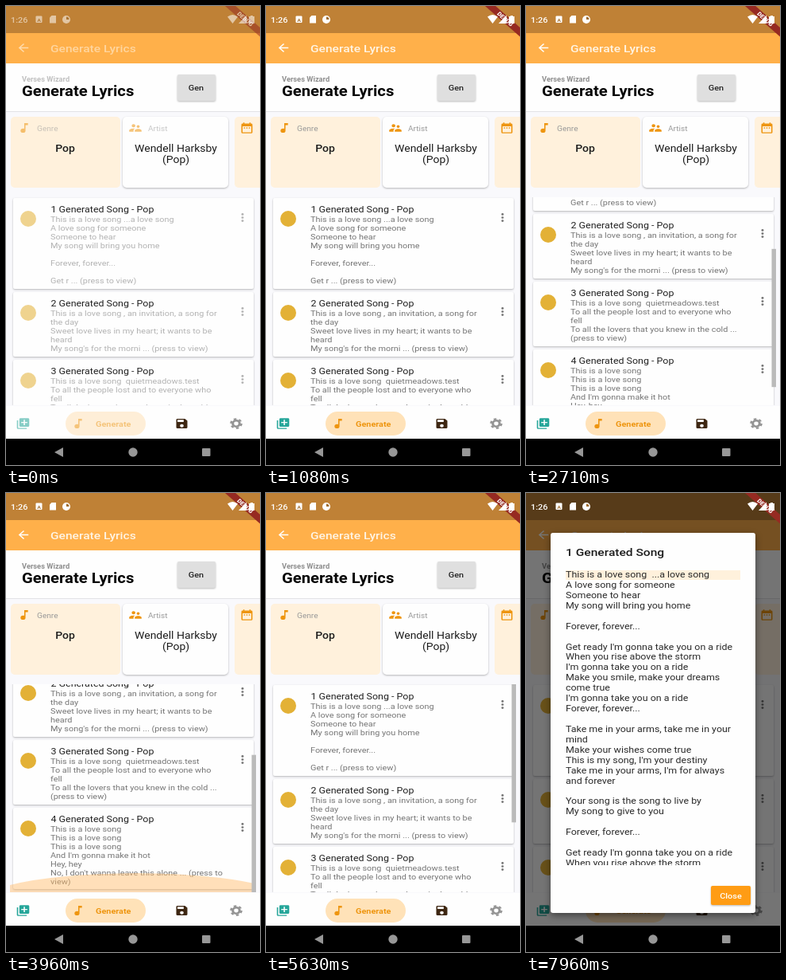
Animation, 320 px wide and 576 px high, one loop 8 s. Source, as an HTML page:

```html
<!DOCTYPE html>
<html lang="en">
<head>
<meta charset="utf-8">
<title>Generate Lyrics</title>
<style>
  html, body { margin: 0; width: 100%; height: 100%; overflow: hidden; background: #000; }
  svg { display: block; width: 100vw; height: 100vh; }
  text { font-family: Roboto, sans-serif; white-space: pre; }
  .card { filter: drop-shadow(0 1px 1px rgba(0, 0, 0, .27)); }
</style>
</head>
<body>
<svg id="stage" viewBox="0 0 320 576" preserveAspectRatio="none"></svg>
<script>
// The phone screen is 411.4 x 846.4 dp, shown on 320 x 576 pixels.
const SX = 320 / 411.4, SY = 576 / 846.4;
const LOOP = 8000, MAX_SCROLL = 134, VIEW_TOP = 240, VIEW_HEIGHT = 262;
const THUMB = VIEW_HEIGHT * VIEW_HEIGHT / (VIEW_HEIGHT + MAX_SCROLL);

const ORANGE = '#ee950f', INK = '#1c1c1c', GREY = '#757575', PEACH = '#fff1dc';

const dp = (x, y) => `transform="translate(${x} ${y}) scale(${SX} ${SY})"`;
const text = (str, x, y, size, fill, weight = 400, anchor = 'start') =>
  `<text ${dp(x, y)} font-size="${size}" fill="${fill}" font-weight="${weight}" text-anchor="${anchor}">${str}</text>`;
const lines = (list, x, y, size, pitch, fill) =>
  list.map((str, i) => text(str, x, y + i * pitch * SY, size, fill)).join('');
const rect = (x, y, w, h, fill, r = 0, extra = '') =>
  `<rect x="${x}" y="${y}" width="${w}" height="${h}" rx="${r}" fill="${fill}" ${extra}/>`;
const icon = (name, x, y, fill) =>
  `<g ${dp(x, y)}><path transform="translate(-12 -12)" d="${ICONS[name]}" fill="${fill}"/></g>`;

const ICONS = {
  back: 'M20 11H7.8l5.6-5.6L12 4l-8 8 8 8 1.4-1.4L7.8 13H20z',
  note: 'M12 3v10.55c-.59-.34-1.27-.55-2-.55a4 4 0 1 0 4 4V7h4V3z',
  people: 'M16.5 12a2.5 2.5 0 1 0 0-5 2.5 2.5 0 0 0 0 5zM9 11a3 3 0 1 0 0-6 3 3 0 0 0 0 6zm7.5 3c-1.8 0-5.5.9-5.5 2.75V19h11v-2.25C22 14.9 18.3 14 16.5 14zM9 13c-2.3 0-7 1.2-7 3.5V19h7v-2.25c0-.85.3-2.3 2.4-3.5C10.5 13.1 9.7 13 9 13z',
  dates: 'M9 11H7v2h2zm4 0h-2v2h2zm4 0h-2v2h2zm2-7h-1V2h-2v2H8V2H6v2H5a2 2 0 0 0-2 2v14a2 2 0 0 0 2 2h14a2 2 0 0 0 2-2V6a2 2 0 0 0-2-2zm0 16H5V9h14z',
  more: 'M12 8a2 2 0 1 0 0-4 2 2 0 0 0 0 4zm0 6a2 2 0 1 0 0-4 2 2 0 0 0 0 4zm0 6a2 2 0 1 0 0-4 2 2 0 0 0 0 4z',
  add: 'M4 6H2v14a2 2 0 0 0 2 2h14v-2H4zm16-4H8a2 2 0 0 0-2 2v12a2 2 0 0 0 2 2h12a2 2 0 0 0 2-2V4a2 2 0 0 0-2-2zm-1 9h-4v4h-2v-4H9V9h4V5h2v4h4z',
  save: 'M17 3H5a2 2 0 0 0-2 2v14a2 2 0 0 0 2 2h14a2 2 0 0 0 2-2V7zm-5 16a3 3 0 1 1 0-6 3 3 0 0 1 0 6zm3-10H5V5h10z'
};

const SONGS = [
  { top: 241, height: 114, lines: ['This is a love song ...a love song', 'A love song for someone', 'Someone to hear',
    'My song will bring you home', '', 'Forever, forever...', '', 'Get r ... (press to view)'] },
  { top: 359, height: 81, lines: ['This is a love song , an invitation, a song for', 'the day',
    'Sweet love lives in my heart; it wants to be', 'heard', "My song's for the morni ... (press to view)"] },
  { top: 444, height: 81, lines: ['This is a love song  quietmeadows.test', 'To all the people lost and to everyone who', 'fell',
    'To all the lovers that you knew in the cold ...', '(press to view)'] },
  { top: 529, height: 102, lines: ['This is a love song', 'This is a love song', 'This is a love song',
    "And I'm gonna make it hot", 'Hey, hey', "No, I don't wanna leave this alone ... (press to", 'view)'] }
];

const LYRICS = ['This is a love song  ...a love song', 'A love song for someone', 'Someone to hear',
  'My song will bring you home', '', 'Forever, forever...', '', "Get ready I'm gonna take you on a ride",
  'When you rise above the storm', "I'm gonna take you on a ride", 'Make you smile, make your dreams', 'come true',
  "I'm gonna take you on a ride", 'Forever, forever...', '', 'Take me in your arms, take me in your', 'mind',
  'Make your wishes come true', "This is my song, I'm your destiny", "Take me in your arms, I'm for always",
  'and forever', '', 'Your song is the song to live by', 'My song to give to you', '', 'Forever, forever...', '',
  "Get ready I'm gonna take you on a ride", 'When you rise above the storm'];

const songCard = (song, i) =>
  rect(9, song.top, 303, song.height, '#fefefe', 2, 'class="card"') +
  `<g class="soft"><circle cx="28" cy="${song.top + 26}" r="10" fill="#e3b136"/>` +
  icon('more', 298, song.top + 24.5, GREY) +
  lines(song.lines, 56, song.top + 30.4, 14, 16, GREY) + '</g>' +
  text(`${i + 1} Generated Song - Pop`, 56.5, song.top + 18.3, 16, '#222');

const header =
  rect(0, 0, 320, 34, '#bf8136') + rect(0, 34, 320, 38, '#ffb04a') +
  `<g class="soft">${icon('back', 22, 52.5, '#fff')}${text('Generate Lyrics', 56, 57.5, 20, '#fff4e4', 500)}</g>` +
  rect(0, 72, 320, 60, '#fefefe') + rect(0, 132, 320, 1, '#e2e2e6') +
  `<g class="soft">${text('Verses Wizard', 20, 94.5, 12, '#8e8e8e', 700)}</g>` +
  text('Generate Lyrics', 20, 112.5, 26, '#050505', 700) +
  rect(216, 86, 48, 33, '#dfdfdf', 2, 'class="card"') + text('Gen', 239.5, 105.5, 14, '#222', 500, 'middle');

const filters =
  rect(6, 139, 138, 89, PEACH, 5) + rect(147, 139, 133, 89, '#fefefe', 5, 'class="card"') +
  rect(288, 139, 40, 89, PEACH, 5) +
  `<g class="soft">${icon('note', 23, 153, ORANGE)}${text('Genre', 39, 157, 13, '#999')}` +
  `${icon('people', 163, 153, ORANGE)}${text('Artist', 179, 157, 13, '#999')}</g>` +
  icon('dates', 303.5, 153, ORANGE) +
  text('Pop', 74.5, 182.5, 18, INK, 500, 'middle') +
  text('Wendell Harksby', 214, 182.5, 18, INK, 400, 'middle') +
  text('(Pop)', 214, 196.8, 18, INK, 400, 'middle');

const songList =
  `<clipPath id="view">${rect(0, VIEW_TOP, 320, VIEW_HEIGHT - 1, '#000')}</clipPath>
  <g clip-path="url(#view)">
    <g id="list">${SONGS.map(songCard).join('')}</g>
    <g id="glow"><path d="M5 0V-9Q60 -23 165 -24Q260 -23 313 -11V0Z" fill="#ffb964" opacity=".45"/></g>
    ${rect(309.5, 0, 5.5, THUMB, '#bababa', 0, 'id="thumb"')}
  </g>`;

const bottomBar =
  rect(0, 502, 320, 41, '#fefefe') +
  `<g class="soft">${icon('add', 21.5, 524, '#26a69a')}${rect(75, 509, 101, 30, '#ffe2b8', 15)}` +
  icon('note', 91, 524, ORANGE) + text('Generate', 113, 527.7, 14, ORANGE, 700) + '</g>' +
  icon('save', 221.5, 524, '#3e2712') +
  `<g ${dp(290, 524)} fill="none" stroke="#939393"><circle r="5.5" stroke-width="4"/>
    <circle r="8.5" stroke-width="3" stroke-dasharray="4.6 4.3"/></g>`;

const dialog =
  `<g id="dialog">${rect(0, 0, 320, 543, '#000', 0, 'opacity=".54"')}
    ${rect(31, 50, 258, 477, '#fefefe', 3, 'style="filter:drop-shadow(0 3px 4px rgba(0,0,0,.45))"')}
    ${text('1 Generated Song', 50, 79, 20, INK, 500)}
    ${rect(50, 97, 220, 12, PEACH, 0, 'id="highlight"')}
    <clipPath id="page">${rect(40, 90, 240, 377, '#000')}</clipPath>
    <g clip-path="url(#page)">${lines(LYRICS, 50, 106, 16, 19, '#2b2b2b')}</g>
    ${rect(233, 493, 50, 24, '#ff9c14', 2, 'class="card"')}
    ${text('Close', 258, 508.7, 14, '#fff', 500, 'middle')}</g>`;

const ribbon =
  `<g class="soft" transform="translate(320 0) scale(${SX} ${SY}) rotate(45)">
    ${rect(-40, 28, 80, 12, '#962a22')}
    <text y="37.6" font-size="10.2" font-weight="900" fill="#fff" text-anchor="middle">DEBUG</text></g>`;

const statusBar =
  `<g class="soft" fill="#fff">${text('1:26', 6, 21, 14, '#fff', 500)}
    ${rect(37.5, 12.5, 8, 8.5, '#fff', 1)}${text('A', 41.5, 19.7, 9, '#a06c2c', 700, 'middle')}
    <path d="M57.5 12H63V21.5H55V14.5Z"/>
    <circle cx="76" cy="17" r="5"/><path d="M76 17V13.5A3.5 3.5 0 0 1 79.5 17Z" fill="#a06c2c"/>
    <path d="M279 13.5Q285.5 8.5 292 13.5L285.5 22Z"/><path d="M293 22L303 11.5V22Z"/>
    <path d="M306 13H308V12H311V13H313V22H306Z"/></g>`;

const systemBar =
  rect(0, 543, 320, 33, '#000') +
  `<g fill="#979797"><path d="M61 560L72 554V566Z"/><circle cx="160" cy="560" r="5.7"/>
    ${rect(247, 555, 10.5, 10, '#979797', 1)}</g>`;

stage.innerHTML = rect(0, 0, 320, 576, '#f9f9fc') + songList + header + filters + bottomBar +
  dialog + ribbon + statusBar + systemBar;

const [list, glow, thumb, highlight, dialogBox] =
  ['list', 'glow', 'thumb', 'highlight', 'dialog'].map(id => document.getElementById(id));
const softParts = document.querySelectorAll('.soft');

const ramp = (t, from, to) => Math.min(1, Math.max(0, (t - from) / (to - from)));
const easeOut = p => 1 - (1 - p) ** 3;
const fling = (t, start) => easeOut(ramp(t, start, start + 595));

function draw(t) {
  const scroll = MAX_SCROLL * (fling(t, 2500) - fling(t, 4640));
  list.setAttribute('transform', `translate(0 ${-scroll})`);
  thumb.setAttribute('y', VIEW_TOP + scroll * THUMB / VIEW_HEIGHT);
  thumb.setAttribute('opacity', ramp(t, 2500, 2650) - ramp(t, 5830, 6130));

  const pull = easeOut(ramp(t, 3750, 3950)) - easeOut(ramp(t, 4000, 4600));
  glow.setAttribute('transform', `translate(0 501) scale(1 ${pull})`);
  glow.setAttribute('opacity', pull);

  dialogBox.setAttribute('opacity', easeOut(ramp(t, 6420, 6630)));
  highlight.setAttribute('opacity', ramp(t, 7500, 7900));

  const settle = ramp(t, 40, 300);
  softParts.forEach(part => part.setAttribute('opacity', .55 + .45 * settle));
}

function tick(now) {
  draw(now % LOOP);
  requestAnimationFrame(tick);
}
draw(0);
requestAnimationFrame(tick);
</script>
</body>
</html>
```
